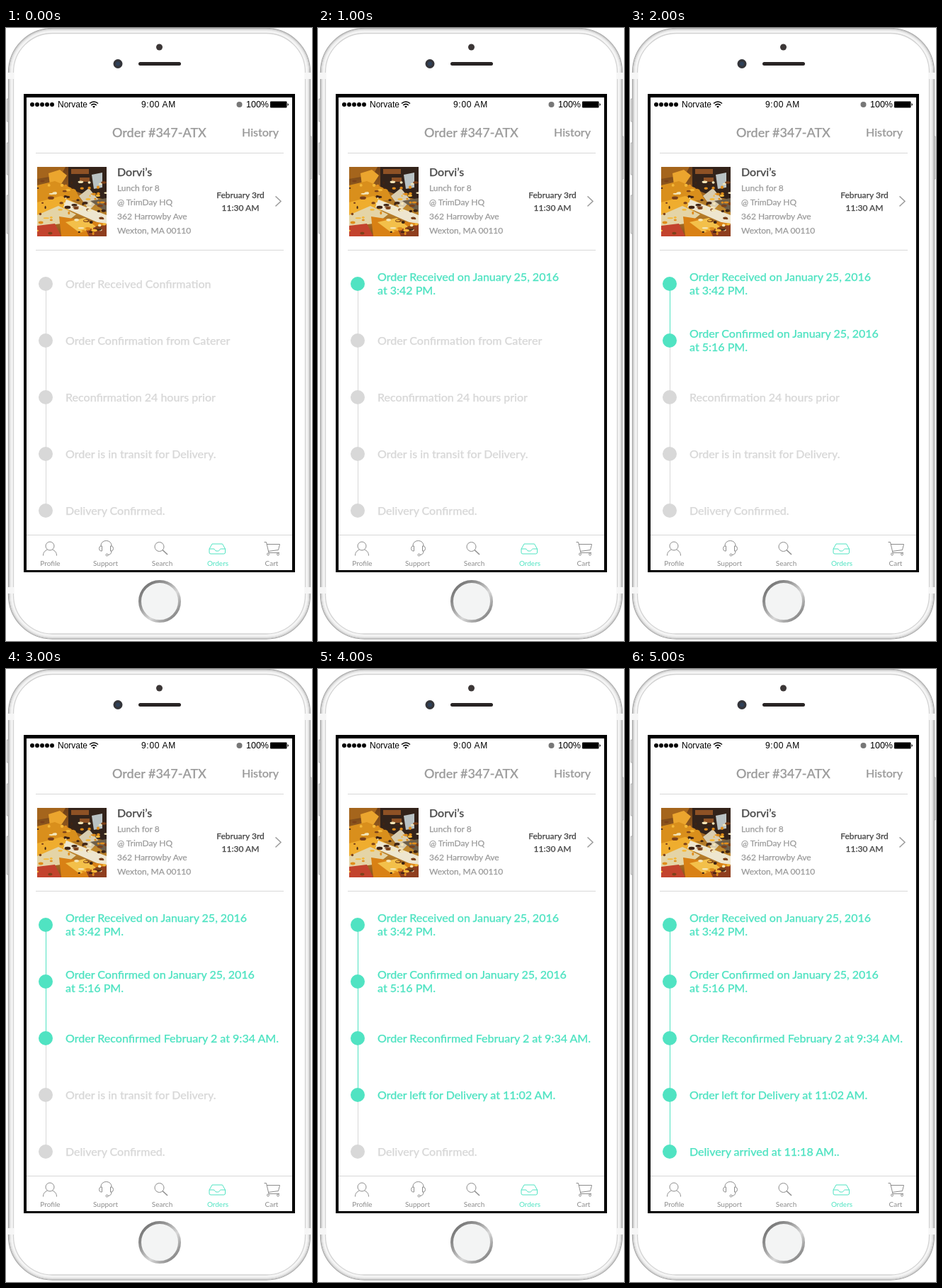
Write an HTML page that moves like this. It is 432x865 px and loops after 6000 ms.

```html
<!DOCTYPE html>
<html lang="en">
<head>
<meta charset="utf-8">
<title>Order tracking</title>
<style>
  html, body { margin: 0; width: 100%; height: 100%; overflow: hidden; background: #fff; }
  svg { display: block; }
  text { font: 500 16px Lato, sans-serif; stroke-width: .25px; }
  .status text { font: 12px "Liberation Sans", Arial, sans-serif; }
  .muted { fill: #9b9b9b; stroke: #9b9b9b; }
  .dark { fill: #4a4a4a; stroke: #4a4a4a; }
  .small text { font-size: 12px; }
  .details text { font-weight: 400; }
  .tabs text { font-size: 10px; font-weight: 400; text-anchor: middle; fill: #8c8c8c; }
  .tabs path, .tabs circle { fill: none; stroke: #8c8c8c; }
  .tabs .active path { stroke: #50e3c2; }
  .tabs .active text { fill: #50e3c2; }
  .rule { stroke: #d8d8d8; }
  .middle { text-anchor: middle; }
</style>
</head>
<body>
<svg width="432" height="865" viewBox="0 0 432 865">
  <defs>
    <linearGradient id="ring" x1="0" y1="0" x2="1" y2="1">
      <stop offset="0" stop-color="#666"/>
      <stop offset=".35" stop-color="#999"/>
      <stop offset=".6" stop-color="#d8d8d8"/>
      <stop offset="1" stop-color="#666"/>
    </linearGradient>
    <linearGradient id="shop" x1="0" y1="0" x2="0" y2="1">
      <stop offset="0" stop-color="#6b3d17"/>
      <stop offset=".35" stop-color="#9a6020"/>
      <stop offset=".6" stop-color="#c28a2d"/>
      <stop offset="1" stop-color="#8a4f1c"/>
    </linearGradient>
    <clipPath id="photoClip"><path d="M44 196h98v98H44z"/></clipPath>
  </defs>

  <!-- Phone body -->
  <path d="M4 100H1.500v32H4M4 162H1.500v45H4M4 236H1.500v54H4M429 153h2v60h-2" fill="#eee" stroke="#b0b0b0"/>
  <g id="shell" fill="#fff"></g>
  <path d="M2 63h9v9H2zM422 63h9v9h-9zM2 789h9v9H2zM422 789h9v9h-9z" fill="#f6f6f6"/>
  <circle cx="216.500" cy="27" r="4.500" fill="#3c3737"/>
  <circle cx="158" cy="50.500" r="6.500" fill="#34353a"/>
  <circle cx="158" cy="50.500" r="3" fill="#2f4159"/>
  <rect x="187" y="48" width="60" height="5" rx="2.500" fill="#292525"/>
  <circle cx="217" cy="809" r="28" fill="#f3f4f4" stroke="url(#ring)" stroke-width="4"/>
  <path d="M25 93h383v675H25z"/>
  <path d="M29 98h375v667H29z" fill="#fff"/>

  <!-- Status bar -->
  <g class="status">
    <g id="signal"></g>
    <text x="73" y="112">Norvate</text>
    <path d="M118 106.500q6-5 12 0M120.200 109q3.800-3.200 7.600 0" fill="none" stroke="#000" stroke-width="1.600"/>
    <path d="M122 110.700q2-1.500 4 0l-2 2z"/>
    <text x="191" y="112" letter-spacing=".7">9:00 AM</text>
    <circle cx="329.500" cy="108" r="4" fill="#777"/>
    <text x="339" y="112" style="font-size:12.500px">100%</text>
    <rect x="373" y="103.500" width="23.500" height="9" rx="1"/>
    <path d="M397.500 106q3 2 0 4z"/>
  </g>

  <!-- Order summary -->
  <text class="muted" x="150" y="154" style="font-size:18px">Order #347-ATX</text>
  <text class="muted" x="333" y="153">History</text>
  <path class="rule" d="M42 176.500h350M42 313.500h350M29 715.500h375"/>
  <g clip-path="url(#photoClip)">
    <path d="M44 196h98v98H44z" fill="url(#shop)"/>
    <path d="M88 196h54v46l-24-4-30-12z" fill="#33231a"/>
    <path d="M44 196h40l-6 11-34 6z" fill="#a5651c"/>
    <path d="M60 205l16-5 10 8-8 12-16 2z" fill="#eba52e"/>
    <path d="M92 199h25v7H92zM104 211h14v6h-14z" fill="#8e5125"/>
    <path d="M121 207l15-3v21l-12 2z" fill="#b9c2c4"/>
    <path d="M44 222l25-6 29 12 7 14-35 4-26 8z" fill="#d98f1c"/>
    <path d="M44 246l34-9 23 11-17 14-40 4z" fill="#efad2e"/>
    <path d="M44 264l30-13 25 12-15 12-40 6z" fill="#e4d4a6"/>
    <path d="M103 237l14-11 14 17-13 14z" fill="#d9cdb0"/>
    <path d="M85 242l57 22v16l-61-27z" fill="#eee6cf"/>
    <path d="M119 244l23-4v20z" fill="#6d5f4a"/>
    <path d="M75 266l67 10v18H78z" fill="#d98114"/>
    <path d="M84 274l27-6 17 13-24 8z" fill="#f3c04a"/>
    <path d="M44 279l25-3 9 18H44z" fill="#c3432d"/>
    <path d="M113 285l29-9v18h-25z" fill="#8f3e1e"/>
    <g id="produce"></g>
  </g>
  <text class="dark" x="157" y="209">Dorvi’s</text>
  <g class="small muted details">
    <text x="157" y="230">Lunch for 8</text>
    <text x="157" y="250">@ TrimDay HQ</text>
    <text x="157" y="270">362 Harrowby Ave</text>
    <text x="157" y="290">Wexton, MA 00110</text>
  </g>
  <g class="small dark middle">
    <text x="331" y="240">February 3rd</text>
    <text x="331" y="258">11:30 AM</text>
  </g>
  <path d="M380.500 237.500l7.500 7-7.500 7" fill="none" stroke="#9b9b9b" stroke-width="1.500"/>

  <g id="timeline"></g>

  <!-- Tab bar -->
  <g class="tabs">
    <g>
      <circle cx="62" cy="731" r="6"/>
      <path d="M52.500 744.500c0-4.500 2.500-7 6-8.500M71.500 744.500c0-4.500-2.500-7-6-8.500"/>
      <text x="62.500" y="759">Profile</text>
    </g>
    <g>
      <path d="M134 731v-1a7.500 6.500 0 0 1 15 0v1M135.500 731v7h-1.500q-2.500-.5-2.500-3.500t2.500-3.500zM147.500 731v7h1.500q2.500-.5 2.500-3.500t-2.500-3.500zM149 738q0 5-5 5.500"/>
      <circle cx="142.500" cy="743.500" r="1.500"/>
      <text x="140.500" y="759">Support</text>
    </g>
    <g>
      <circle cx="216.500" cy="732" r="6.500"/>
      <path d="M221 736.500l7 6.500" stroke-width="1.500"/>
      <text x="220.500" y="759">Search</text>
    </g>
    <g class="active">
      <path d="M287 735l4-7h14.500l4 7v5q0 2-2 2h-18.500q-2 0-2-2zM287 735h6q1.500 0 2 1.500t2 1.500h2.500q1.500 0 2-1.500t2-1.500h6"/>
      <text x="299" y="759">Orders</text>
    </g>
    <g>
      <path d="M364.500 725.500h3l3.500 15h15M368 728.500h18.500l-2 8-14.500 2"/>
      <circle cx="370" cy="742.500" r="1.500"/>
      <circle cx="384" cy="742.500" r="1.500"/>
      <text x="375" y="759">Cart</text>
    </g>
  </g>
</svg>
<script>
  const TEAL = '#50e3c2', GRAY = '#d8d8d8';
  const STEP_MS = 1000, LOOP_MS = 6000;
  const steps = [
    ['Order Received Confirmation', 'Order Received on January 25, 2016|at 3:42 PM.'],
    ['Order Confirmation from Caterer', 'Order Confirmed on January 25, 2016|at 5:16 PM.'],
    ['Reconfirmation 24 hours prior', 'Order Reconfirmed February 2 at 9:34 AM.'],
    ['Order is in transit for Delivery.', 'Order left for Delivery at 11:02 AM.'],
    ['Delivery Confirmed.', 'Delivery arrived at 11:18 AM..'],
  ];
  const byId = id => document.getElementById(id);
  const repeat = (count, draw) => Array.from({ length: count }, (_, i) => draw(i)).join('');

  // Nested outlines shade the metal edge from dark to white.
  const edgeTones = ['#a6a6a6', '#c6c6c6', '#dadada', '#e8e8e8', '#f0f0f0', '#f5f5f5', '#f5f5f5', '#d2d2d2'];
  byId('shell').innerHTML = repeat(edgeTones.length, i =>
    `<rect x="${3.5 + i}" y="${.5 + i}" width="${426 - 2 * i}" height="${861.5 - 2 * i}" rx="${62 - i}" stroke="${edgeTones[i]}" stroke-width="1.3"/>`);

  byId('signal').innerHTML = repeat(5, i => `<circle cx="${37 + 7 * i}" cy="108" r="3"/>`);

  let seed = 7;
  const random = () => (seed = seed * 16807 % 2147483647) / 2147483647;
  const foods = ['#f5b93a', '#7c421a', '#f4e6b8', '#e08d1c', '#3f2414'];
  byId('produce').innerHTML = repeat(90, i =>
    `<ellipse cx="${44 + 98 * random()}" cy="${216 + 76 * random()}" rx="${1 + 3.5 * random()}" ry="${1 + 1.3 * random()}" fill="${foods[i % 5]}"/>`);

  function drawStep([pending, done], i, phase) {
    const y = 361 + 80 * i;
    const color = phase > i ? TEAL : GRAY;
    const lines = (phase > i ? done : pending).split('|');
    const baseline = y + (lines.length > 1 ? -4 : 6);
    return `<circle cx="56" cy="${y}" r="10" fill="${color}"/>` + lines.map((line, n) =>
      `<text x="84" y="${baseline + 19 * n}" fill="${color}" stroke="${color}">${line}</text>`).join('');
  }

  function drawTimeline(phase) {
    const links = repeat(4, i =>
      `<path d="M56.500 ${361 + 80 * i}v80" stroke="${phase > i + 1 ? TEAL : GRAY}"/>`);
    byId('timeline').innerHTML = links + steps.map((step, i) => drawStep(step, i, phase)).join('');
  }

  let shown = -1;
  function tick() {
    const phase = Math.floor(performance.now() % LOOP_MS / STEP_MS);
    if (phase !== shown) drawTimeline(shown = phase);
    requestAnimationFrame(tick);
  }
  tick();
</script>
</body>
</html>
```
